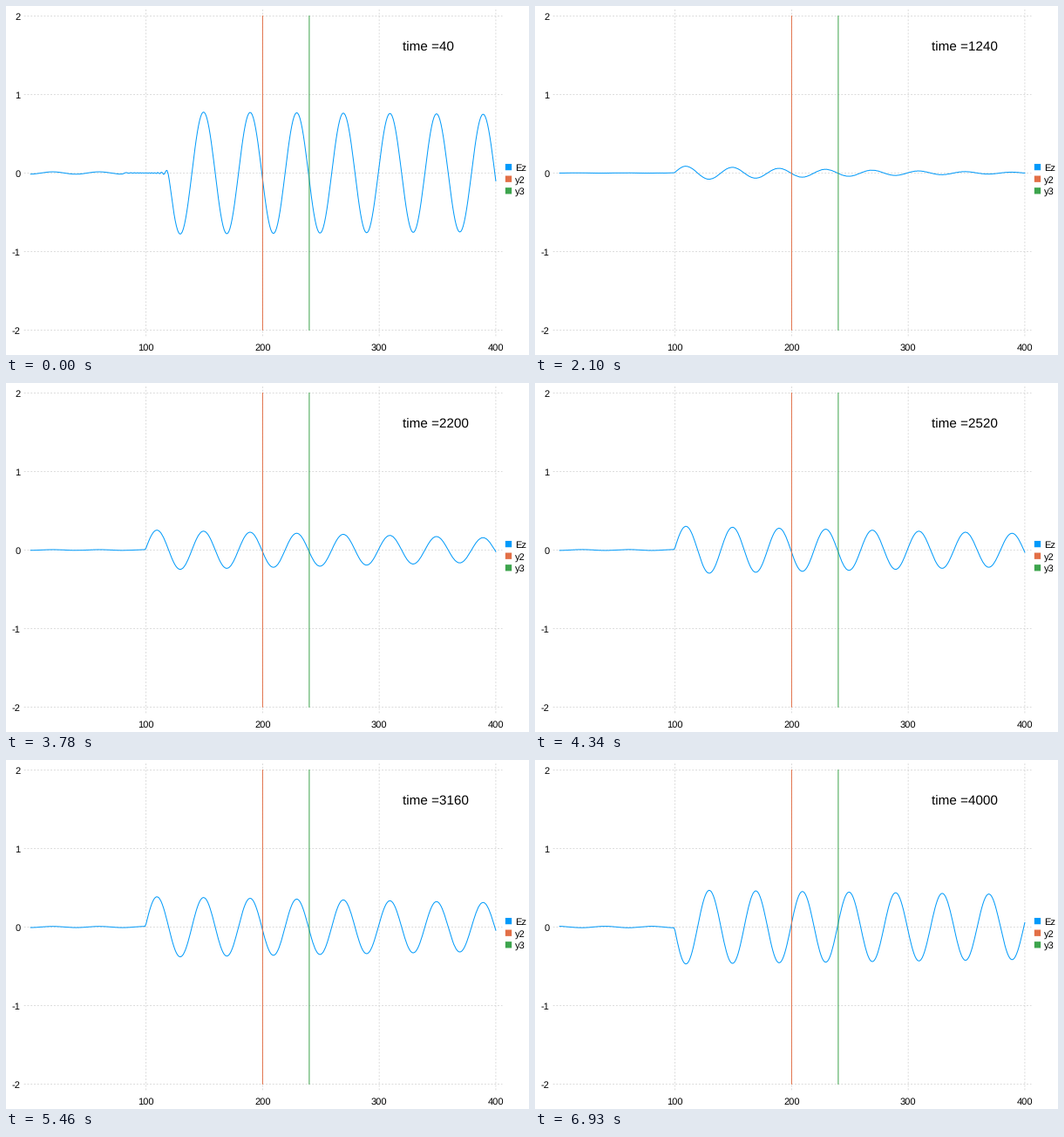
Write a matplotlib script that moves like this. It is 600 px wide and 400 px high and loops after 7 s.

```python
import numpy as np
import matplotlib.pyplot as plt
from matplotlib.animation import FuncAnimation
from matplotlib.patches import Rectangle

plt.rcParams["font.family"] = "Liberation Sans"
plt.rcParams["text.hinting"] = "none"
plt.rcParams["text.hinting_factor"] = 8

W, H, DPI = 600, 400, 100
PX = 72 / DPI                 # points per pixel
FRAMES, INTERVAL = 100, 70
STEPS_PER_FRAME = 40

CELLS, COURANT, PERIOD = 400, 0.5, 80
SRC = 99                      # first total-field node, counted from 0

BLUE, ORANGE, GREEN = "#009afa", "#e26f46", "#3da44d"
GRID = "#d0d0d0"
SMALL, LARGE = 8, 11


def px(x):
    return 26.9 + 1.3375 * x


def py(y):
    return 191.4 - 90 * y


def source(t, ramp):
    return np.sin(2 * np.pi * t / PERIOD) * np.exp(-ramp / max(t, 1))


def step(ez, hy, t, ramp):
    """Advance the 1D Yee grid with a one-way source and Mur boundaries."""
    drive = COURANT * source(t, ramp)
    old = ez[[0, 1, -2, -1]]
    ez[1:-1] += COURANT * (hy[1:] - hy[:-1])
    ez[SRC] += drive
    mur = (COURANT - 1) / (COURANT + 1)
    ez[0] = old[1] + mur * (ez[1] - old[0])
    ez[-1] = old[2] + mur * (ez[-2] - old[3])
    hy += COURANT * (ez[1:] - ez[:-1])
    hy[SRC - 1] -= drive


def simulate():
    """Fields of a slow-ramp run that starts on the remains of a faster one."""
    ez, hy = np.zeros(CELLS), np.zeros(CELLS - 1)
    total = FRAMES * STEPS_PER_FRAME
    for t in range(total):
        step(ez, hy, t, 1000)
    shots = []
    for t in range(total):
        step(ez, hy, t, 3000)
        if (t + 1) % STEPS_PER_FRAME == 0:
            shots.append(ez.copy())
    return shots


fields = simulate()

fig = plt.figure(figsize=(W / DPI, H / DPI), dpi=DPI, facecolor="white")
ax = fig.add_axes([0, 0, 1, 1])
ax.set_xlim(0, W)
ax.set_ylim(H, 0)
ax.axis("off")


def line(xs, ys, color, width=1, **kw):
    return ax.plot(xs, ys, color=color, lw=width * PX, snap=False, **kw)[0]


def label(x, y, text, size=SMALL, ha="left"):
    return ax.text(x, y, text, size=size, ha=ha, va="baseline", color="black")


dots = dict(linestyle=(0, (2.5, 2.5)), zorder=1)
for v in range(-2, 3):
    line([20.7, 569.5], [py(v)] * 2, GRID, 0.76, **dots)
    label(16.8, py(v) + 4.1, str(v), ha="right")
for v in range(100, 401, 100):
    line([px(v)] * 2, [4, 379], GRID, 0.76, **dots)
    label(px(v), 395, str(v), ha="center")

wave = line([], [], BLUE, zorder=2)
for v, color in ((200, ORANGE), (240, GREEN)):
    line([px(v)] * 2, [py(2), py(-2)], color, zorder=3)

side = 7.3
for i, (name, color) in enumerate(zip(("Ez", "y2", "y3"), (BLUE, ORANGE, GREEN))):
    y = 184.6 + 13.6 * i
    ax.add_patch(Rectangle((576.5 - side / 2, y - side / 2), side, side,
                           color=color, lw=0, snap=False))
    label(583.7, y + 4.1, name)

clock = label(px(320), 52, "", LARGE)
xs = px(np.arange(1, CELLS + 1))


def update(n):
    wave.set_data(xs, py(fields[n]))
    clock.set_text(f"time ={(n + 1) * STEPS_PER_FRAME}")
    return wave, clock


anim = FuncAnimation(fig, update, frames=FRAMES, interval=INTERVAL, repeat=True)
plt.show()
```
